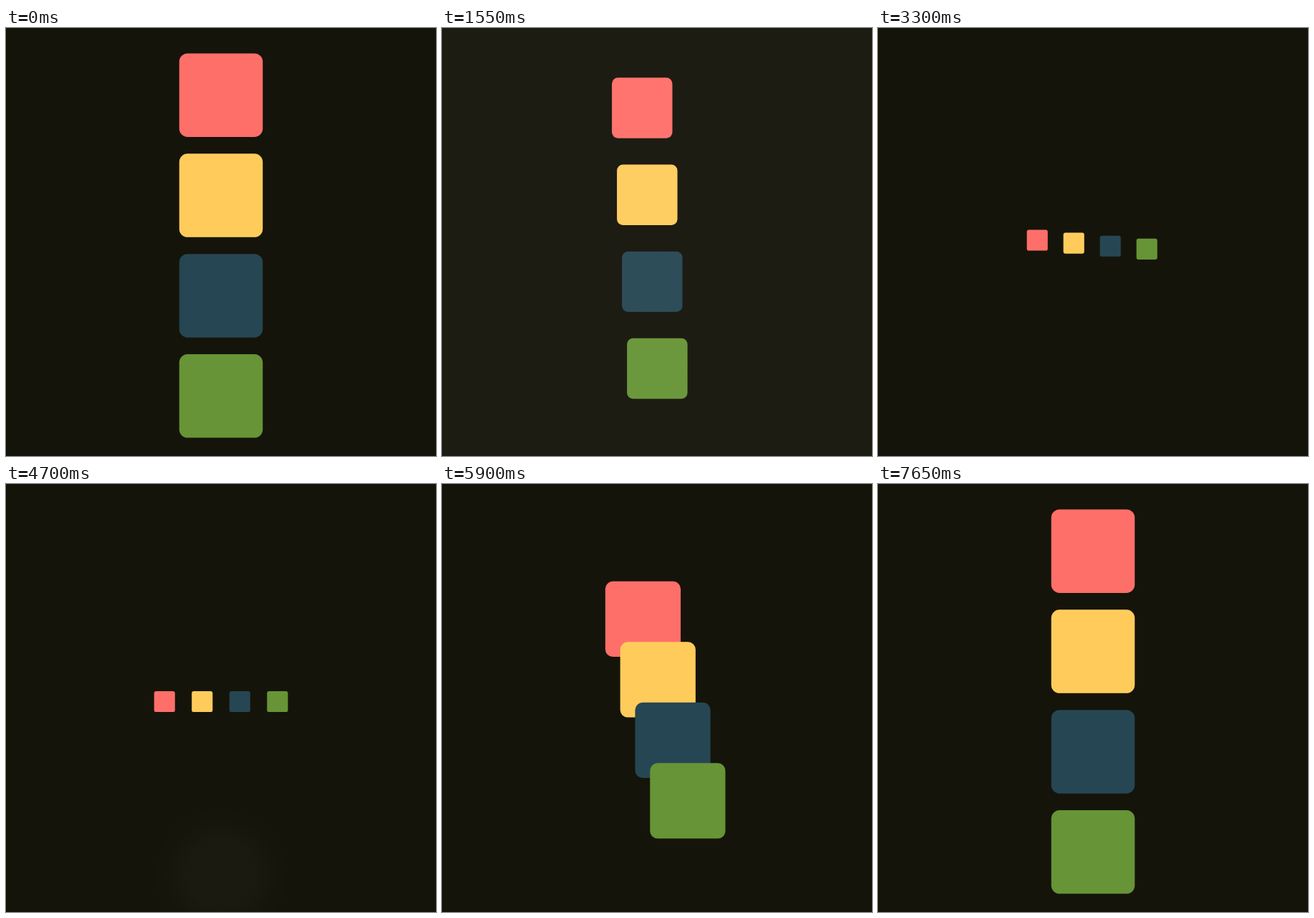
Animation of 600x597 px, one loop 7850 ms. Source, as an HTML page with a canvas:

```html
<!DOCTYPE html>
<html lang="en">
<head>
<meta charset="utf-8">
<title>Column to row</title>
<style>
  html, body { margin: 0; width: 100%; height: 100%; overflow: hidden; background: #15140a; }
  canvas { display: block; width: 100vw; height: 100vh; }
</style>
</head>
<body>
<canvas id="stage"></canvas>
<script>
const W = 600, H = 597, LOOP = 7850, STEP = 50;
const BACK = '#15140a';
const COLORS = ['#ff6f69', '#ffcc5c', '#264653', '#679436'];
const CX = 300, CY = 303.5, BIG = 116.5, SMALL = BIG / 4, GAP = 23.4;
const MOVE_MS = 3000, SIZE_MS = 2000;
const TO_ROW = 950, TO_COLUMN = 4714;
const PRESS_LEAD = 80, ENTER_MS = 450, EXIT_MS = 375;
const RIPPLE_ALPHA = 0.106, RIPPLE_RADIUS = 973;

const canvas = document.getElementById('stage');
const ctx = canvas.getContext('2d');
const ratio = window.devicePixelRatio || 1;
canvas.width = Math.round(W * ratio);
canvas.height = Math.round(H * ratio);
ctx.scale(ratio, ratio);

const clamp = v => Math.min(1, Math.max(0, v));
const mix = (a, b, k) => a + (b - a) * k;
const smooth = v => v * v * (3 - 2 * v);

// cubic-bezier(0.4, 0, 0.2, 1)
function ease(x) {
  if (x <= 0 || x >= 1) return clamp(x);
  let lo = 0, hi = 1;
  for (let i = 0; i < 30; i++) {
    const u = (lo + hi) / 2, v = 1 - u;
    if (1.2 * v * v * u + 0.6 * v * u * u + u * u * u < x) lo = u;
    else hi = u;
  }
  return smooth(lo);
}

// 0 is the tall column, 1 the small row
const phase = (t, ms) => ease((t - TO_ROW) / ms) - ease((t - TO_COLUMN) / ms);

function drawSquares(t) {
  const move = phase(t, MOVE_MS);
  const size = mix(BIG, SMALL, phase(t, SIZE_MS));
  COLORS.forEach((color, i) => {
    const k = i - 1.5;
    const x = mix(CX - BIG / 2, CX + k * (SMALL + GAP) - SMALL / 2, move);
    const y = mix(CY + k * (BIG + GAP) - BIG / 2, CY - SMALL / 2, move);
    ctx.fillStyle = color;
    ctx.beginPath();
    ctx.roundRect(x, y, size, size, size * 0.1);
    ctx.fill();
  });
}

// Soft circle that spreads from the press point, then fades out
function drawRipple(age) {
  if (age <= 0 || age >= ENTER_MS + EXIT_MS) return;
  const progress = age < ENTER_MS
    ? 0.5 * ease(age / ENTER_MS)
    : 0.5 + 0.5 * (age - ENTER_MS) / EXIT_MS;
  const fade = Math.min(clamp(progress / 0.13), 1 - clamp((progress - 0.4) / 0.6));
  const radius = RIPPLE_RADIUS * clamp(progress / 0.45);
  if (radius < 0.1) return;
  const y = mix(560, CY, clamp(progress * 2));
  const glow = ctx.createRadialGradient(CX, y, radius * 0.5, CX, y, radius * 1.5);
  for (let i = 0; i <= 10; i++) {
    const alpha = RIPPLE_ALPHA * fade * (1 - smooth(i / 10));
    glow.addColorStop(i / 10, `rgba(255,255,255,${alpha.toFixed(5)})`);
  }
  ctx.fillStyle = glow;
  ctx.fillRect(0, 0, W, H);
}

function draw(t) {
  ctx.fillStyle = BACK;
  ctx.fillRect(0, 0, W, H);
  drawSquares(t);
  for (const start of [TO_ROW, TO_COLUMN]) drawRipple(t - start + PRESS_LEAD);
}

const begin = performance.now();
function tick() {
  const t = (performance.now() - begin) % LOOP;
  draw(Math.floor(t / STEP) * STEP);
  requestAnimationFrame(tick);
}
tick();
</script>
</body>
</html>
```
